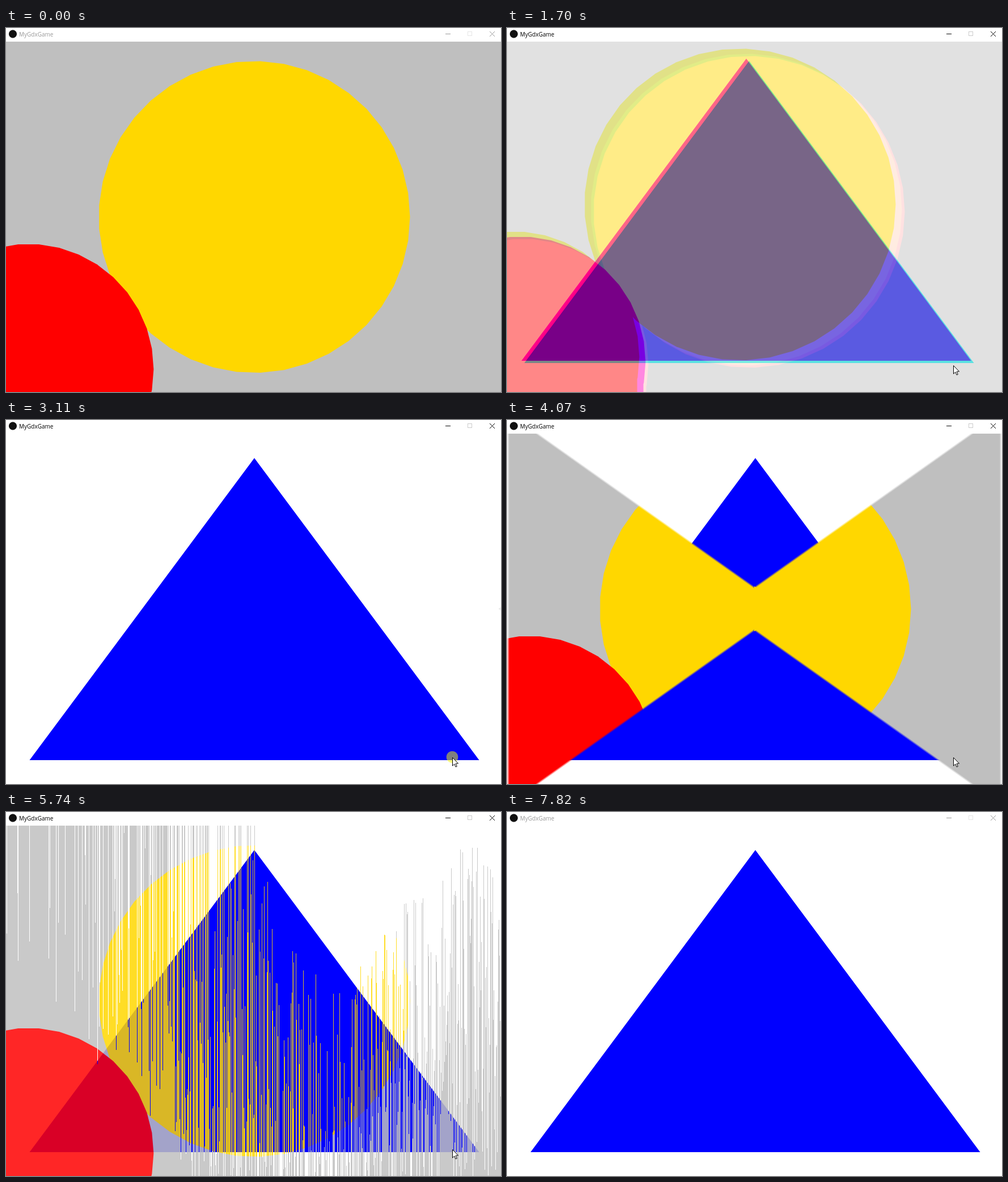
Animation, 873 px wide and 641 px high, one loop 7.9 s. Source, as an HTML page with a canvas:

```html
<!DOCTYPE html>
<html lang="en">
<head>
<meta charset="utf-8">
<title>MyGdxGame</title>
<style>
  html, body { margin: 0; width: 100%; height: 100%; overflow: hidden; background: #fff; }
  canvas { display: block; position: absolute; left: 0; top: 0; }
  #title { position: absolute; left: 23px; top: 0; font: 10px/22px "Open Sans", "Noto Sans", sans-serif; }
</style>
</head>
<body>
<canvas id="stage" width="873" height="641"></canvas>
<div id="title">MyGdxGame</div>
<script>
const LOOP = 7900, BAR = 24, W = 873, H = 617;
const ctx = document.getElementById('stage').getContext('2d');
const title = document.getElementById('title');

function polygon(c, points, color) {
  c.beginPath();
  points.forEach(([x, y]) => c.lineTo(x, y));
  c.closePath();
  c.fillStyle = color;
  c.fill();
}

const disc = (cx, cy, r, n) => Array.from({ length: n }, (_, i) => {
  const a = i / n * 2 * Math.PI;
  return [cx + r * Math.cos(a), cy - r * Math.sin(a)];
});

// Scenes are drawn in window coordinates, then read below the title bar.
function scene(back, shapes) {
  const canvas = document.createElement('canvas');
  canvas.width = W;
  canvas.height = H;
  const c = canvas.getContext('2d');
  c.fillStyle = back;
  c.fillRect(0, 0, W, H);
  c.translate(0, -BAR);
  shapes.forEach(([points, color]) => polygon(c, points, color));
  return c.getImageData(0, 0, W, H);
}

const circles = scene('#bfbfbf', [
  [disc(438, 332.7, 274.5, 41), '#ffd700'],
  [disc(39.7, 601, 220.7, 38), '#f00']
]);
const triangle = scene('#fff', [[[[438, 67], [834.5, 599], [41.5, 599]], '#00f']]);

const fract = v => v - Math.floor(v);
const clamp = (v, lo, hi) => Math.max(lo, Math.min(hi, v));

// Simplex noise along y = 0: corner x, corner y, gradient hash.
const corners = [[.7887, -.2113, 35], [.5774, .5774, 172], [1.366, .366, 54]];
function noise(x) {
  let sum = 0;
  for (const [cx, cy, hash] of corners) {
    const g = 2 * fract(hash / 41) - 1, h = Math.abs(g) - .5, a = g - Math.floor(g + .5);
    const dx = x - cx, dy = -cy;
    sum += Math.max(.5 - dx * dx - dy * dy, 0) ** 4
      * (1.79284 - .85373 * (a * a + h * h)) * (a * dx + h * dy);
  }
  return 130 * sum;
}
const column = f => Float64Array.from({ length: W }, (_, i) => f((i + .5) / W));
const swell = column(x => Math.exp(noise(x)));
const random = column(x => fract(Math.sin(12.9898 * x + 7.8233) * 43758.5453));

// Each effect gives the blend weight at a point (y up) and may shift the channels.
const glitch = p => {
  const jump = rate => (fract(Math.floor(p * rate) / 64) - .5) * .3 * (1 - p);
  const dx = jump(1200), dy = jump(3500);
  return {
    weight: () => p,
    shift: [.2, .3, .5].map(k => [Math.round(dx * k * W), Math.round(-dy * k * H)])
  };
};

const bowTie = p => {
  const edge = (u, v) => Math.min(1, Math.min(u, (p - u - v) / Math.SQRT2) / .005);
  return {
    weight(x, y) {
      const v = Math.abs(y - .5);
      if (x + v < p) return p < .1 ? 0 : x < .5 ? edge(x, v) : 1;
      return 1 - x + v < p && x >= .5 ? edge(1 - x, v) : 0;
    }
  };
};

const melt = p => ({
  weight: (x, y, i) =>
    Math.hypot(1 - x, 1 - y) <= p * (1 + swell[i]) - random[i] ? 1 : p ** 3
});

const still = [[0, 0], [0, 0], [0, 0]];
const output = ctx.createImageData(W, H);
output.data.fill(255);

function blend(from, to, { weight, shift = still }) {
  const a = from.data, b = to.data, out = output.data;
  for (let y = 0, o = 0; y < H; y++) {
    for (let x = 0; x < W; x++, o += 4) {
      const m = weight((x + .5) / W, 1 - (y + .5) / H, x);
      for (let c = 0; c < 3; c++) {
        const sx = clamp(x + shift[c][0], 0, W - 1), sy = clamp(y + shift[c][1], 0, H - 1);
        const s = (sy * W + sx) * 4 + c;
        out[o + c] = a[s] + (b[s] - a[s]) * m;
      }
    }
  }
  return output;
}

// start, duration, from, to, effect
const transitions = [
  [787.4, 1720.7, circles, triangle, glitch],
  [3100, 1645, triangle, circles, bowTie],
  [4750, 1790, circles, triangle, melt]
];

// Screen updates: first, last, intervals between them.
const runs = [
  [0, 1, 1], [830, 1090, 7], [1090, 1600, 14], [1700, 2490, 18], [2520, 2521, 1],
  [3110, 3900, 20], [3940, 4730, 18], [4760, 5150, 9], [5150, 5530, 8],
  [5560, 6300, 16], [6300, 6330, 1], [6360, 6540, 4]
];

function snap(t) {
  const [a, b, n] = runs.filter(r => r[0] <= t).pop();
  const step = (b - a) / n;
  return a + Math.min(n, Math.floor((t - a) / step + 1e-6)) * step;
}

function picture(t) {
  const current = transitions.filter(r => r[0] <= t).pop();
  if (!current) return circles;
  const [start, length, from, to, effect] = current;
  const p = (t - start) / length;
  return p >= 1 ? to : blend(from, to, effect(p));
}

function strokes(color, lines) {
  ctx.strokeStyle = color;
  ctx.lineWidth = 1;
  ctx.beginPath();
  for (const [x1, y1, x2, y2] of lines) {
    ctx.moveTo(x1, y1);
    ctx.lineTo(x2, y2);
  }
  ctx.stroke();
}

function drawBar(active) {
  const ink = active ? '#000' : '#999';
  title.style.color = ink;
  ctx.fillStyle = '#fff';
  ctx.fillRect(0, 0, W, BAR);
  polygon(ctx, disc(12, 10.5, 7, 48), '#111');
  strokes(ink, [[775, 10.5, 784, 10.5], [853, 6, 862, 15], [853, 15, 862, 6]]);
  ctx.strokeStyle = active ? '#ccc' : '#e6e6e6';
  ctx.strokeRect(814.5, 6.5, 7, 7);
}

const arrow = [[0, 0], [0, 14.5], [3.3, 11.4], [5.6, 16.5], [7.8, 15.5], [5.5, 10.6], [10, 10.4]];

function drawCursor(t) {
  if (t < 130 || t >= 7160) return;
  const away = t < 600 ? (1 - (t - 130) / 470) ** 2 : t > 6760 ? ((t - 6760) / 400) ** 2 : 0;
  const x = 787.5 + away * (t < 600 ? 7 : 10), y = 594.5 + away * 45;
  polygon(ctx, arrow.map(([dx, dy]) => [x + dx, y + dy]), '#fff');
  ctx.strokeStyle = '#000';
  ctx.lineWidth = 1;
  ctx.stroke();
}

function drawClick(t) {
  if (![830, 3110].some(at => t >= at && t < at + 100)) return;
  polygon(ctx, disc(787, 593.5, 10.3, 48), 'rgba(255,255,0,.5)');
}

let shownAt = -1, shown;
function draw(now) {
  const t = now % LOOP, at = snap(t);
  if (at !== shownAt) {
    shown = picture(at);
    shownAt = at;
  }
  ctx.putImageData(shown, 0, BAR);
  drawBar(t >= 830 && t < 7820);
  drawClick(t);
  drawCursor(t);
}

const begin = performance.now();
function tick() {
  draw(performance.now() - begin);
  requestAnimationFrame(tick);
}
tick();
</script>
</body>
</html>
```
